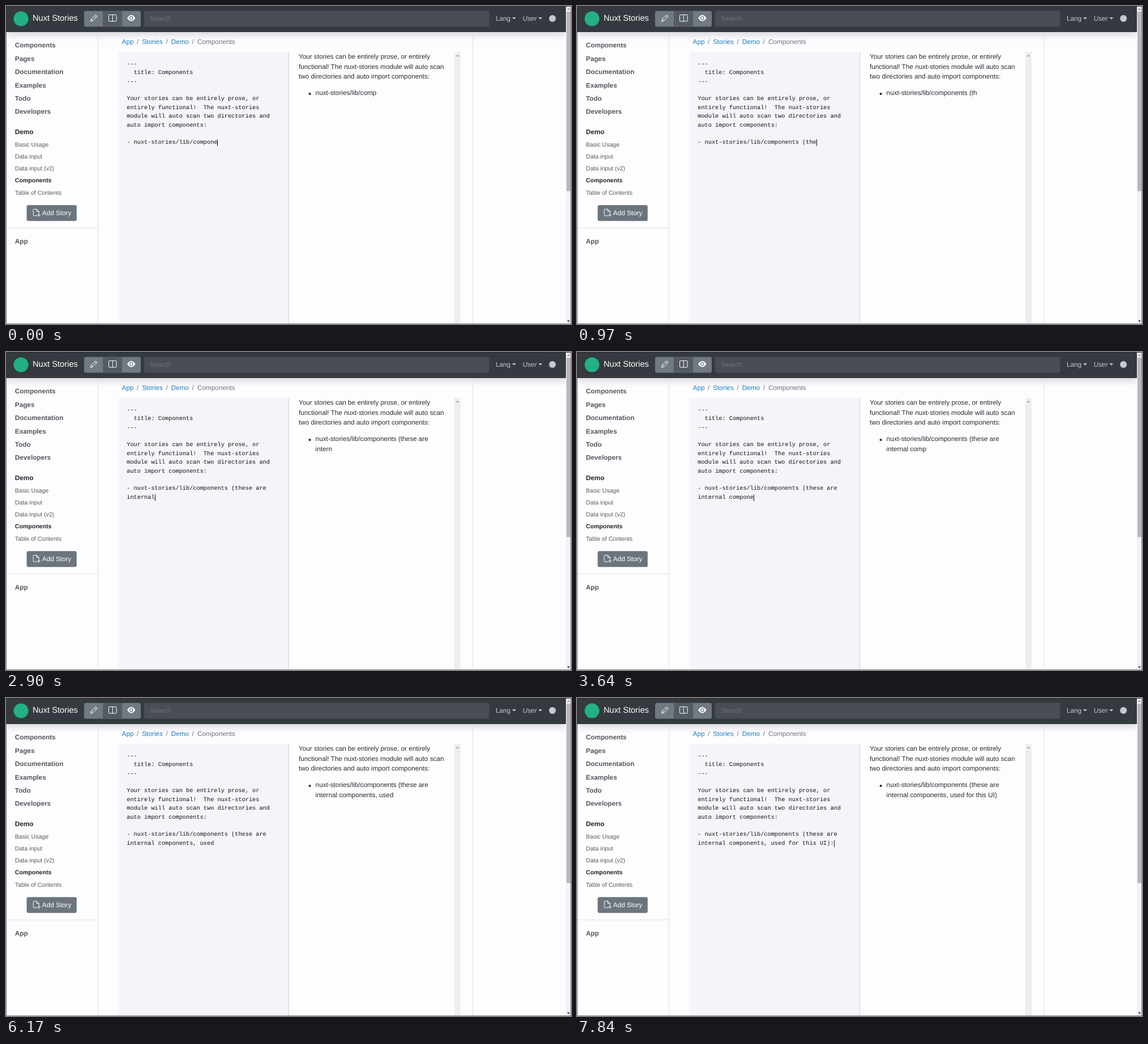
Recreate the animation shown at these times as an HTML page. Size 998x561 px, loop 8000 ms.

```html
<!DOCTYPE html>
<html lang="en">
<head>
<meta charset="utf-8">
<title>Story editor</title>
<style>
  html, body { margin: 0; width: 100%; height: 100%; overflow: hidden; background: #fdfcfe; }
  #stage { position: relative; width: 998px; height: 561px; overflow: hidden;
    font: 11.75px/17.62px "Liberation Sans", Arial, sans-serif; color: #2b2d33;
    text-rendering: geometricPrecision; }
  #stage > * { position: absolute; }
  svg { left: 0; top: 0; font-size: 11.75px; }
  #bar { left: 0; top: 0; width: 989px; height: 45.5px; background: #343a40;
    box-shadow: 0 5.9px 11.7px rgba(30, 20, 60, .15); }
  #editor { left: 213.3px; top: 95.7px; width: 272px; color: #111;
    font: 10.28px/15.42px "Liberation Mono", "Courier New", monospace;
    white-space: pre-wrap; }
  #caret { position: relative; }
  #caret::after { content: ""; position: absolute; left: 0; top: 0; width: 1px; height: 12px; background: #111; }
  #prose { left: 517px; top: 81.1px; white-space: nowrap; }
  #item { left: 546.6px; top: 145.4px; width: 228.5px; }
  .nav { font-weight: bold; fill: #55565c; }
  .small { font-size: 10.57px; fill: #5a5b61; }
  .active { font-weight: bold; fill: #212529; }
  .link { fill: #1a80c4; }
  .muted { fill: #6c757d; }
  .menu { fill: #c9c6d6; }
  .icon { fill: none; stroke: #fff; stroke-linejoin: round; stroke-linecap: round; }
</style>
</head>
<body>
<div id="stage">
  <div id="bar"></div>
  <svg width="998" height="561" viewBox="0 0 998 561">
    <!-- top bar -->
    <circle cx="26.5" cy="22.5" r="13" fill="#22b184"/>
    <text x="47" y="26" font-size="14.68" fill="#fff">Nuxt Stories</text>
    <rect x="138" y="8.8" width="100" height="27.8" rx="3" fill="#717a82"/>
    <rect x="171" y="8.8" width="34" height="27.8" fill="#545b62"/>
    <g class="icon">
      <path d="M149.5 27l1.2-4 7.6-7.5 2.8 2.8-7.6 7.5zM156.4 17.3l2.8 2.8M150.7 23l2.8 2.8"/>
      <rect x="181.5" y="15.5" width="13.5" height="11.5" rx="1"/>
      <path d="M188.3 15.5v11.5"/>
    </g>
    <path d="M214 21.3q7.3-10.6 14.6 0q-7.3 10.6-14.6 0z" fill="#fff"/>
    <circle cx="221.3" cy="21.3" r="3.3" fill="#717a82"/>
    <circle cx="221.3" cy="21.3" r="2" fill="#fff"/>
    <rect x="244" y="8.8" width="609.5" height="27.8" rx="3" fill="#4a4d55"/>
    <text x="254" y="26.3" class="muted">Search</text>
    <g class="menu">
      <text x="865" y="26.2">Lang</text>
      <text x="912.5" y="26.2" font-style="italic">User</text>
      <path d="M894 20h7l-3.5 3.6zM940.3 20h7l-3.5 3.6z"/>
      <circle cx="965.2" cy="22" r="6"/>
    </g>

    <!-- sidebar -->
    <g class="nav">
      <text x="15.8" y="73.2">Components</text>
      <text x="15.8" y="96.6">Pages</text>
      <text x="15.8" y="120.1">Documentation</text>
      <text x="15.8" y="143.5">Examples</text>
      <text x="15.8" y="167">Todo</text>
      <text x="15.8" y="190.4">Developers</text>
      <text x="15.8" y="225.6" class="active">Demo</text>
      <text x="15.8" y="419">App</text>
    </g>
    <g class="small">
      <text x="15.8" y="247.8">Basic Usage</text>
      <text x="15.8" y="269">Data input</text>
      <text x="15.8" y="290.2">Data input (v2)</text>
      <text x="15.8" y="311.4" class="active">Components</text>
      <text x="15.8" y="332.6">Table of Contents</text>
    </g>
    <rect x="36.5" y="351.3" width="88.3" height="28" rx="3" fill="#6c757d"/>
    <g class="icon">
      <path d="M54.5 370h-5q-1.3 0-1.3-1.3v-9q0-1.3 1.3-1.3h4.7l4 4v3.2M54.2 358.4v4h4M58 366.4v5M55.5 368.9h5"/>
    </g>
    <text x="63.8" y="369.3" fill="#fff">Add Story</text>
    <path d="M0 391.5h162.5M162.5 46v515M824.5 46v515" stroke="#e2dfe8" fill="none"/>

    <!-- breadcrumb -->
    <text x="204.6" y="67.3" class="link">App</text>
    <text x="231" y="67.3" class="muted">/</text>
    <text x="240.2" y="67.3" class="link">Stories</text>
    <text x="282.4" y="67.3" class="muted">/</text>
    <text x="291.8" y="67.3" class="link">Demo</text>
    <text x="328.6" y="67.3" class="muted">/</text>
    <text x="338" y="67.3" class="muted">Components</text>

    <!-- panes -->
    <rect x="198.5" y="81" width="301" height="480" fill="#f5f4f9"/>
    <path d="M499.5 81v480" stroke="#d3cfd6"/>
    <rect x="792" y="81" width="11" height="480" fill="#efeeee"/>
    <path d="M794.8 89h5.6l-2.8-3.6z" fill="#a5a4a8"/>
    <circle cx="536.6" cy="155" r="2.1" fill="#2b2d33"/>

    <!-- window edge and scrollbar -->
    <rect x="989" y="0" width="9" height="561" fill="#f3f2f5"/>
    <rect x="990" y="10" width="7" height="316.5" fill="#b9b8bd"/>
    <path d="M991 7h5l-2.5-3.4z" fill="#98979c"/>
    <path d="M991 554.5h5l-2.5 3.4z" fill="#444"/>
    <path d="M0 .5h998" stroke="#26292d"/>
    <path d="M.5 46v515M0 560.5h998M997.5 0v561" stroke="#85848a" fill="none"/>
  </svg>
  <div id="editor"><span id="typed"></span><span id="caret"></span></div>
  <div id="prose">Your stories can be entirely prose, or entirely<br>functional! The nuxt-stories module will auto scan<br>two directories and auto import components:</div>
  <div id="item"></div>
</div>
<script>
  const LOOP = 8000, PREVIEW_LAG = 270;
  const intro = `---
  title: Components
---

Your stories can be entirely prose, or entirely functional!  The nuxt-stories module will auto scan two directories and auto import components:

`;
  const line = "- nuxt-stories/lib/components (these are internal components, used for this UI):";
  const START = 23;

  // Bursts of keys: first time, gap between keys, number of keys
  const bursts = [
    [-220, 80, 3], [100, 95, 3], [430, 90, 4], [880, 0, 1],
    [1430, 100, 2], [1690, 250, 2], [2000, 55, 3], [2195, 85, 8],
    [2950, 89, 11], [4570, 0, 1], [4840, 40, 5],
    [6250, 66, 9], [6830, 65, 3], [7180, 0, 1], [7770, 0, 1]
  ];
  const keys = bursts.flatMap(([t, gap, n]) => Array.from({ length: n }, (_, i) => t + i * gap));
  const textAt = t => line.slice(0, START + keys.filter(k => k <= t).length);

  const [typed, caret, item] = ["typed", "caret", "item"].map(id => document.getElementById(id));
  const setText = (el, s) => { if (el.textContent !== s) el.textContent = s; };

  function draw() {
    const t = performance.now() % LOOP;
    setText(typed, intro + textAt(t));
    setText(item, textAt(t - PREVIEW_LAG).slice(2));
    caret.style.visibility = t >= 5810 && t < 6250 ? "hidden" : "visible";
    requestAnimationFrame(draw);
  }
  draw();
</script>
</body>
</html>
```
